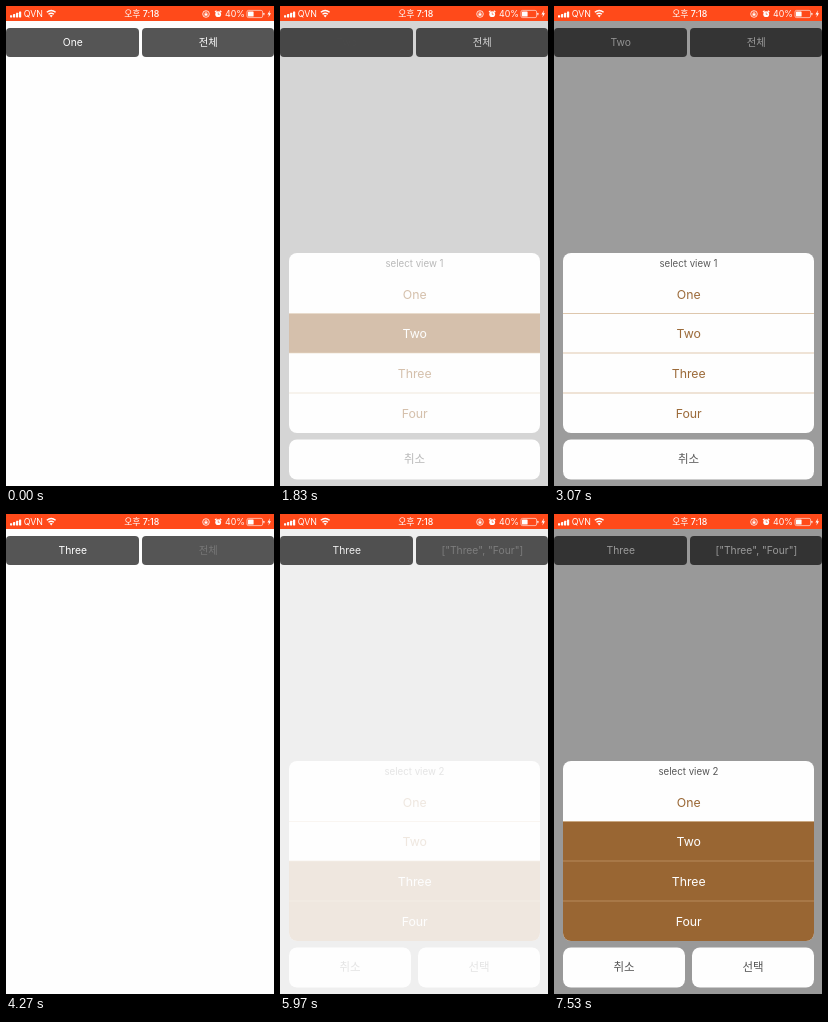
Animation of 268 by 480 pixels, one loop 8000 ms. Source, as an HTML page:

```html
<!DOCTYPE html>
<html lang="ko">
<head>
<meta charset="utf-8">
<title>Select sheet</title>
<style>
html, body { margin: 0; width: 100%; height: 100%; overflow: hidden; background: #fefefe; }
svg { display: block; width: 100%; height: 100%; }
text { font-family: Inter, "Noto Sans CJK KR", "Noto Sans CJK", "Noto Sans", sans-serif; text-anchor: middle; }
</style>
</head>
<body>
<svg id="stage" viewBox="0 0 268 480"></svg>
<script>
const LOOP = 8000;
const ROWS = ["One", "Two", "Three", "Four"];
const ROW_Y = [268, 307.5, 347, 387, 427];
const WHITE = "#fefefe", GREY = "#555", BROWN = "#963", BAR = "#ff4a1a";

// One visit to a sheet: button pressed, sheet shown, sheet hidden.
const VISITS = [
  { sheet: 0, press: 470, show: 570, hide: 1730, row: 1 },
  { sheet: 0, press: 2570, show: 2810, hide: 3400, row: 2 },
  { sheet: 1, press: 4270, show: 4370, hide: 5800 },
  { sheet: 1, press: 6430, show: 6530, hide: Infinity }
];
const TITLES = [
  [[-Infinity, "One"], [1730, "Two"], [3400, "Three"]],
  [[-Infinity, "전체"], [5800, '["Three", "Four"]']]
];
const PICKS = [[0, [0, 1, 2, 3]], [5130, [1, 2, 3]], [5430, [2, 3]], [7530, [1, 2, 3]]];

const stage = document.getElementById("stage");
function add(parent, tag, attrs, content) {
  const el = document.createElementNS("http://www.w3.org/2000/svg", tag);
  for (const k in attrs) el.setAttribute(k, attrs[k]);
  if (content) el.textContent = content;
  parent.appendChild(el);
  return el;
}
const box = (p, x, y, width, height, fill, rx = 0) => add(p, "rect", { x, y, width, height, fill, rx });
const label = (p, x, y, size, fill, s, weight = 400) =>
  add(p, "text", { x, y, "font-size": size, fill, "font-weight": weight }, s);
const path = (p, d, attrs) => add(p, "path", { d, fill: "none", stroke: WHITE, ...attrs });

function makeButton(x, width, mid) {
  box(stage, x, 22, width, 29, GREY, 4);
  return label(stage, mid, 40.2, 10.3, WHITE, "");
}

function makeSheet(parent, n) {
  const g = add(parent, "g", {});
  box(g, 9, 247, 251, 180, WHITE, 8);
  label(g, 134.5, 261.3, 9.7, GREY, "select view " + (n + 1));
  const rows = ROWS.map((name, i) => {
    const top = ROW_Y[i], end = ROW_Y[i + 1];
    const fill = i < 3
      ? box(g, 9, top, 251, end - top, BROWN)
      : path(g, `M9 ${top}H260V419A8 8 0 0 1 252 427H17A8 8 0 0 1 9 419Z`, { fill: BROWN, stroke: "none" });
    const text = label(g, 134.7, (i ? top + 24.6 : 292.5), 12.3, "", name);
    return { fill, text };
  });
  for (const y of ROW_Y.slice(1, 4)) box(g, 9, y - 0.3, 251, 0.6, "#c9a276");
  const ends = n ? [[9, 122, "취소"], [138, 122, "선택"]] : [[9, 251, "취소"]];
  for (const [x, w, s] of ends) {
    box(g, x, 433.5, w, 40, WHITE, 8);
    label(g, x + w / 2, 457.4, 11.5, GREY, s, 500);
  }
  return { g, rows };
}

function statusBar() {
  const g = add(stage, "g", {});
  box(g, 0, 0, 268, 15, BAR);
  for (let i = 0; i < 4; i++) box(g, 4 + i * 3, 9.2 - i * 1.2, 2.2, 2.3 + i * 1.2, WHITE, 0.4);
  label(g, 27.3, 11.2, 8.8, WHITE, "QVN");
  path(g, "M40.8 6.3Q45.2 2.7 49.6 6.3M42.5 8.3Q45.2 6.1 47.9 8.3", { "stroke-width": 1.4 });
  path(g, "M43.6 9.6Q45.2 8.4 46.8 9.6L45.2 11.5Z", { fill: WHITE, stroke: "none" });
  label(g, 135.7, 11.2, 8.8, WHITE, "오후 7:18", 500);
  add(g, "circle", { cx: 200, cy: 8, r: 3.3, fill: "none", stroke: WHITE, "stroke-width": 0.8 });
  box(g, 198.5, 7.4, 3, 2.3, WHITE);
  path(g, "M199.2 7.5V6.8A0.8 0.8 0 0 1 200.8 6.8V7.5", { "stroke-width": 0.6 });
  add(g, "circle", { cx: 212.2, cy: 8.2, r: 2.9, fill: WHITE });
  path(g, "M209 6L210.6 4.7M215.4 6L213.8 4.7", { "stroke-width": 1.2 });
  path(g, "M212.2 6.5V8.4H213.6", { stroke: BAR, "stroke-width": 0.6 });
  label(g, 229, 11.2, 8.8, WHITE, "40%");
  add(g, "rect", { x: 241, y: 4.4, width: 15.6, height: 7.2, rx: 1.5, fill: "none", stroke: WHITE, "stroke-width": 0.6 });
  box(g, 242, 5.4, 5.6, 5.2, WHITE, 0.6);
  box(g, 257.4, 6.7, 1, 2.6, WHITE, 0.5);
  path(g, "M264 4.2L261.4 8.5H263L262.4 11.6L265 7.3H263.4Z", { fill: WHITE, stroke: "none" });
}

box(stage, 0, 0, 268, 480, WHITE);
const buttons = [makeButton(0, 133, 66.8), makeButton(136, 132, 202.3)];
const modal = add(stage, "g", {});
box(modal, 0, 0, 268, 480, "rgba(0,0,0,0.4)");
const sheets = [makeSheet(modal, 0), makeSheet(modal, 1)];
statusBar();

const clamp = x => Math.max(0, Math.min(1, x));
const latest = (list, t) => list.filter(e => e[0] <= t).pop();

// Critically damped settling from 0 to 1
function settle(ms) {
  if (ms <= 0) return 0;
  if (ms >= 500) return 1;
  const x = ms * 0.02;
  return 1 - (1 + x) * Math.exp(-x);
}

function titleState(n, t, visit) {
  const list = TITLES[n], now = latest(list, t);
  const age = t - now[0];
  let text = now[1], alpha;
  if (age < 100) {
    text = list[list.indexOf(now) - 1][1];
    alpha = clamp(1 - age / 70);
  } else alpha = clamp((age - 100) / 250);
  if (visit && visit.sheet === n && t < visit.hide)
    alpha *= 0.2 + 0.8 * clamp((t - visit.show) / 300);
  return { text, alpha };
}

function draw(t) {
  const visit = VISITS.filter(v => v.press <= t).pop();
  const alpha = visit ? settle(t - visit.show) * (1 - settle(t - visit.hide)) : 0;
  modal.setAttribute("opacity", alpha);
  modal.setAttribute("display", alpha ? "inline" : "none");

  buttons.forEach((el, n) => {
    const s = titleState(n, t, visit);
    el.textContent = s.text;
    el.setAttribute("opacity", s.alpha);
  });
  if (!visit) return;

  const picked = visit.sheet ? latest(PICKS, t)[1] : t >= visit.hide ? [visit.row] : [];
  sheets.forEach(({ g, rows }, n) => {
    g.setAttribute("display", n === visit.sheet ? "inline" : "none");
    rows.forEach(({ fill, text }, i) => {
      const on = picked.includes(i);
      fill.setAttribute("opacity", on ? 1 : 0);
      text.setAttribute("fill", on ? WHITE : BROWN);
    });
  });
}

const start = performance.now();
function tick() {
  draw((performance.now() - start) % LOOP);
  requestAnimationFrame(tick);
}
tick();
</script>
</body>
</html>
```
